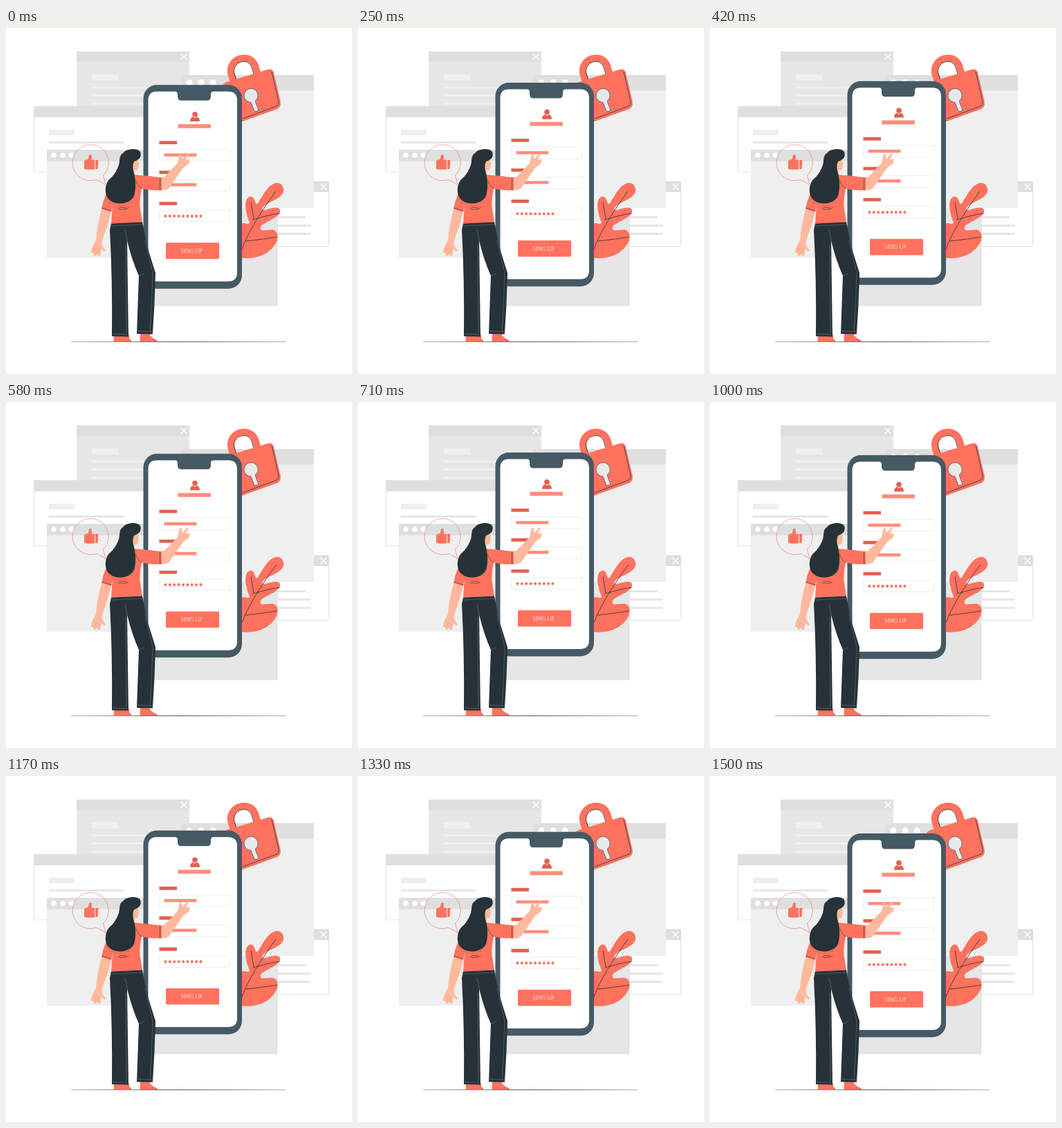
Write an HTML page that moves like this. It is 500 px wide and 500 px high and loops after 1540 ms.

```html
<!DOCTYPE html>
<html lang="en">
<head>
<meta charset="utf-8">
<title>Sign up</title>
<style>
  html, body { margin: 0; width: 100%; height: 100%; overflow: hidden; background: #fff; }
  svg { display: block; width: 100%; height: 100%; }
  .coral { fill: #ff725e; }
  .deep { fill: #e06151; }
  .light { fill: #ff8d7c; }
  .skin { fill: #ffb99d; }
  .dark { fill: #263238; }
  .bar { fill: #dfdfdf; }
  .pane { fill: #efefef; }
  .sheet { fill: #e6e6e6; }
  .white { fill: #fff; }
  .ink { fill: none; stroke: #263238; stroke-width: .8; stroke-linecap: round; }
  .cross { fill: none; stroke: #fff; stroke-width: 1.3; }
  .frame { fill: #fff; stroke: #e2e2e2; stroke-width: 1; }
  .seam { fill: none; stroke: #74808a; stroke-width: .5; }
</style>
</head>
<body>
<svg viewBox="0 0 500 500">
  <g id="windows">
    <path class="sheet" d="M200 260H392.500V402H200Z"/>
    <path class="sheet" d="M102 34H265V170H102Z"/>
    <path class="bar" d="M102 34H265V48.500H102Z"/>
    <path class="cross" d="M252.500 37l9 9m0-9l-9 9"/>
    <path class="pane" d="M124 67h38v9h-38zM124 84.500h80v3h-80zM124 96h80v3h-80zM124 108h80v3h-80z"/>

    <path class="frame" d="M385 222H466.500V315.500H392.500V260Z"/>
    <path class="bar" d="M385 221.500H467V237H385Z"/>
    <path class="cross" d="M454.500 225l9 9m0-9l-9 9"/>
    <path class="sheet" d="M392 272h41v3h-41zM392 284h48.500v3h-48.500zM392 296h48.500v3h-48.500z"/>

    <path class="pane" d="M253 68H445V260H253Z"/>
    <path class="bar" d="M253 68H445V90.500H253Z"/>
    <g class="white"><circle cx="265" cy="79" r="4.500"/><circle cx="282" cy="79" r="4.500"/><circle cx="299" cy="79" r="4.500"/></g>

    <path class="frame" d="M40.500 113.500H210V208H40.500Z"/>
    <path class="bar" d="M40 113H210V129H40Z"/>
    <path class="pane" d="M62 147h37v8h-37z"/>
    <path class="sheet" d="M62 164h108v3h-108z"/>

    <path class="pane" d="M59 176H205V332H59Z"/>
    <path class="bar" d="M59 176H205V192.500H59Z"/>
    <g class="white"><circle cx="69" cy="184" r="3.800"/><circle cx="82" cy="184" r="3.800"/><circle cx="94.500" cy="184" r="3.800"/></g>
  </g>

  <g id="lock">
    <path d="M329.500 79L325.500 67C320 43 354 34 360.500 56L365 71" fill="none" stroke="#ff725e" stroke-width="10"/>
    <path class="ink" d="M333 75L330 66C326 49 350 41 355 57L358 67"/>
    <path class="coral" d="M313 83Q314 80 319 78L378 60Q385 58 387 65L396.500 106Q398 114 392 117L342 135L325 136Z"/>
    <path class="ink" d="M384 63L394 106Q395 111 390 113.500L342 131"/>
    <path d="M354 87.500a10 10 0 0 1 6 18l5 13q-2 2.500-6 2l-5-13a10 10 0 0 1 0-20z" fill="#e9e9ec" stroke="#455a64" stroke-width=".8"/>
  </g>

  <g id="leaf">
    <path class="coral" d="M336 332L339 284C344 279 350 286 352 281C345 264 343 246 353 243.500C361 243 359 256 363 254C370 246 375 230 388 224.500C398 221 404 232 400 239C394 249 374 252 370 261C370 269 391 253 396 263C399 273 373 280 368 287C365 298 382 288 389 293C397 301 391 315 377 325C365 332 352 334 336 332Z"/>
    <path class="ink" d="M341 319Q352 288 390 236M358 276L354 252M357 277Q380 270 395 268M346 308Q375 305 391 302"/>
  </g>

  <path d="M94 453.500H404" stroke="#7f898e" stroke-width=".7"/>
  <path d="M113 453.500Q250 452.600 385 453.500Q250 454.400 113 453.500Z" fill="#455a64"/>

  <g id="phone">
    <rect x="198.500" y="82.500" width="142.500" height="294.500" rx="19.500" fill="#455a64"/>
    <path class="white" d="M218 92H244Q248 92 248 96V99Q248 105 253 105H291Q296 105 296 99V96Q296 92 300 92H321Q334 92 334 105V353.500Q334 366.500 321 366.500H218Q205.500 366.500 205.500 353.500V105Q205.500 92 218 92Z"/>
    <g class="deep">
      <circle cx="273" cy="125" r="3.800"/>
      <path d="M266 135.300Q266 129 271 128.500L273 130.500L275 128.500Q280 129 280 135.300Z"/>
      <path d="M221.500 163.500H247V168.300H221.500ZM221.500 206.500H247V211.300H221.500ZM221.500 251.500H247V256.300H221.500Z"/>
    </g>
    <path class="light" d="M248.500 139.200H296V145H248.500Z"/>
    <g fill="none" stroke="#e9e9e9" stroke-width=".8">
      <rect x="221.500" y="175.500" width="102.500" height="17" rx="1"/>
      <rect x="221.500" y="219" width="102.500" height="17" rx="1"/>
      <rect x="221.500" y="263.500" width="102.500" height="16.500" rx="1"/>
    </g>
    <path class="light" d="M228.500 181.500H275.500V186H228.500ZM228.500 224.500H275.500V229H228.500Z"/>
    <path d="M230.500 272H283" stroke="#ff725e" stroke-width="4.200" stroke-linecap="round" stroke-dasharray="0 6.375"/>
    <rect class="coral" x="231" y="310.500" width="77" height="23.500" rx="1.500"/>
    <text x="268" y="325" text-anchor="middle" fill="#ffe9e5" font-family="Liberation Serif, serif" font-size="8">SING UP</text>
  </g>

  <g id="bubble">
    <path d="M131 219A26 26 0 1 1 140.500 213L144 226.500Z" fill="none" stroke="#e98377" stroke-width=".7"/>
    <path class="coral" d="M113 192Q116 190 118.500 190L120.500 183Q124 182 124 187L123.500 190.500H128V204.500H117L113 203.500ZM129 191L133.500 190.500L132.500 203.500L129 204Z"/>
  </g>

  <g id="woman">
    <path class="skin" d="M139 259L152 263Q149 282 142 298L138 312L144 322L142 323L138 319L136 329L133.500 329.500L132 326L129 330L127 328L126 325L122.500 325Q125 313 130 307Q132 282 139 259Z"/>
    <path class="ink" style="stroke:#e8917b;stroke-width:.5" d="M130 318L127 327M134 319L132 326"/>
    <path class="skin" d="M222 216L229 215L248 195Q250 187 251 182L253 182L255 189L262.500 181L264 182L259.500 190L265.500 189.500L264.500 196L256 202L236 231Q233 235 222 234Z"/>
    <path class="skin" d="M181 190L190 187Q193 194 191.500 200Q191 207 186 206L186 216L177 217Z"/>
    <path class="coral" d="M158 214L186 212Q207 214 225 216V234.500Q208 235 196 232Q193 246 193.500 258L197 281L152 282.500L154 255L152 266L138 261.500Q142 239 158 214Z"/>
    <path class="ink" style="stroke-width:.6" d="M162 261Q170 264 177 260M164 259L174 260M196 232Q190 228 188 221M139 260L152 264M222.500 217V234"/>
    <path class="dark" d="M169 181C174 174 190 173 194 179C197 187 191 191 185 193C182 200 184 206 185.500 212C188 222 187.500 235 185 243C178 256 156 257 147 246C142 238 143 226 149 219C157 212 160 206 163 198C165 191 163 184 169 181Z"/>
    <path class="coral" d="M156 444H178V449L181 451V453.500H155.500ZM194 440H208V444Q212 449 218 451L219 453H193.500Z"/>
    <path class="dark" d="M152 282.500L197 280.500Q201 302 206 322L216 354Q215 399 212 442.500L189 442L192 358Q182 336 175 307L177 446L153 445.500Q154 365 150 292Z"/>
    <path class="seam" d="M152 286L197 284M175 307L172 291M192 358L200 355M201 306L212 354Q211 397 208 439M154 442L176 443M190 438L212 439M173 313L174 441"/>
  </g>
</svg>
<script>
  const PERIOD = 1540, TOP_TIME = 710, END_TIME = 1500;
  const START = -0.2, LIFT = -9.5, REST = 0.5;
  const phone = document.getElementById('phone');
  const mix = (a, b, p) => a + (b - a) * Math.min(1, p);

  const offset = t => t < TOP_TIME
    ? mix(START, LIFT, t / TOP_TIME)
    : mix(LIFT, REST, (t - TOP_TIME) / (END_TIME - TOP_TIME));

  const start = performance.now();
  function draw() {
    const t = (performance.now() - start) % PERIOD;
    phone.setAttribute('transform', `translate(0 ${offset(t).toFixed(2)})`);
    requestAnimationFrame(draw);
  }
  draw();
</script>
</body>
</html>
```
